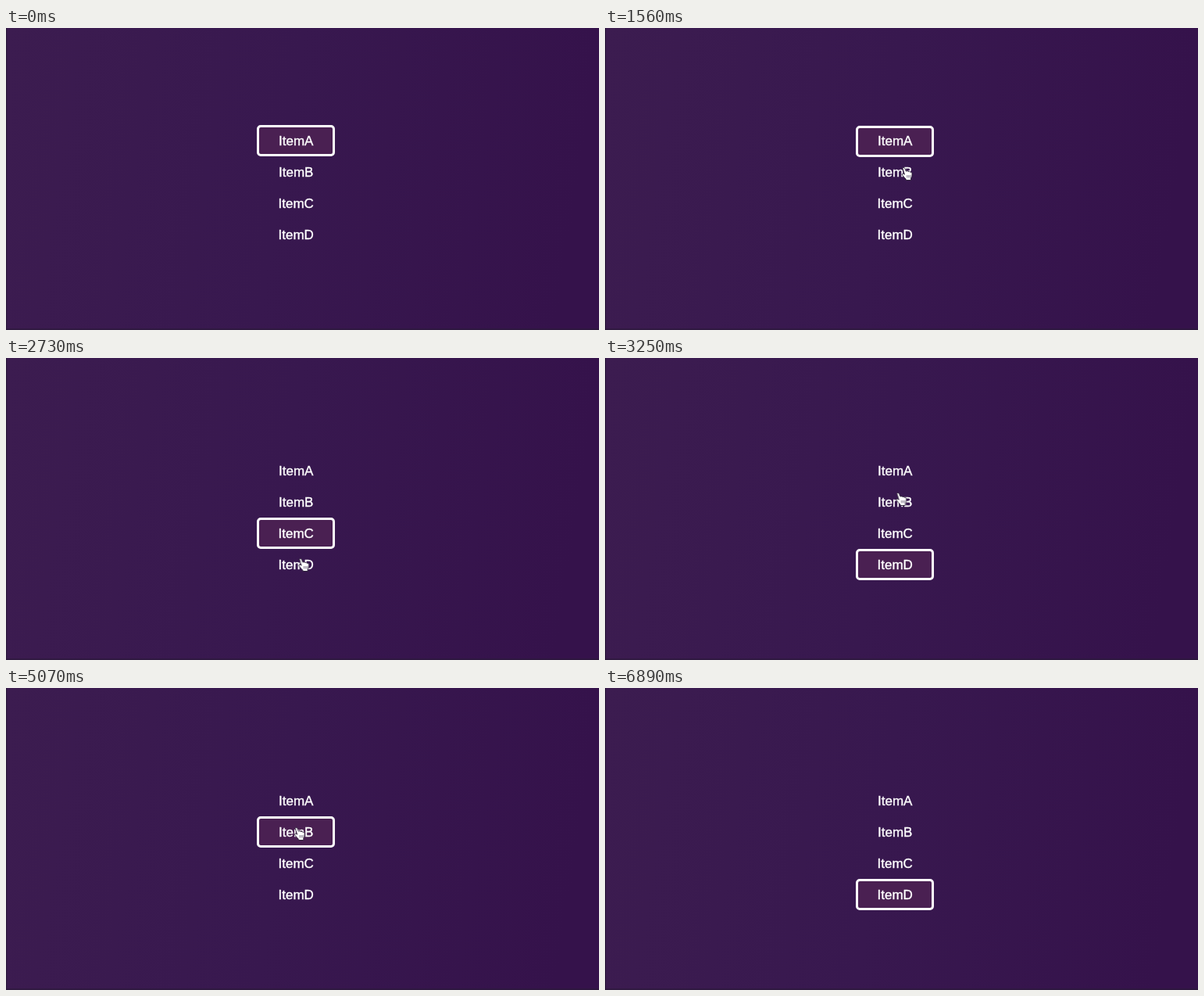
An HTML page for the animation above (7.28 s loop, 759x386 px).

```html
<!DOCTYPE html>
<html lang="en">
<head>
<meta charset="utf-8">
<title>Menu</title>
<style>
  html, body { margin: 0; width: 100%; height: 100%; overflow: hidden; background: #381850; }
  svg { display: block; width: 759px; height: 386px; }
  text {
    font: 17px "Liberation Sans", Arial, sans-serif;
    fill: #fff; stroke: #fff; stroke-width: .4; text-anchor: middle;
  }
</style>
</head>
<body>
<svg viewBox="0 0 759 386">
  <defs>
    <linearGradient id="bg" x1="0" y1="0" x2="1" y2="0.08">
      <stop offset="0" stop-color="#3c1c50"/>
      <stop offset=".5" stop-color="#38184f"/>
      <stop offset="1" stop-color="#35124b"/>
    </linearGradient>
  </defs>
  <rect width="759" height="386" fill="url(#bg)"/>
  <path d="M0.5 0V386M0 385H759" stroke="#2c1a3c" stroke-width="1.5"/>
  <g id="box">
    <rect x="322.5" y="1.5" width="97" height="37" rx="3.5" fill="#4a2052" stroke="#fff" stroke-width="3"/>
  </g>
  <g id="labels"></g>
  <g id="hand">
    <path d="M1 1.5C1 0 3 0 3.6 1.2L5.4 5.2C6.4 4.4 7.6 4.6 8.2 5.6 9.2 5 10.4 5.3 10.8 6.4 12 6 13 6.8 13 8 13.2 11 12.6 12.4 11.6 14V16.5H5.4L5 15C3.4 13.6 2 11.5 .6 10-.4 8.6 1 7.6 2.2 8.4L3.4 9.2Z"
      fill="#fff" stroke="#241a30" stroke-width=".9" stroke-linejoin="round"/>
    <path d="M6.8 10V13.4M8.8 10V13.4M10.8 10V13.4" stroke="#4a3c58" stroke-width=".7"/>
  </g>
</svg>
<script>
const LOOP = 7280, TICK = 130, TOP = 124, ROW = 40, SLIDE = 220;
const SPRING = 'cubic-bezier(.4, 0, .3, 1.5)';
const A = 0, B = 1, C = 2, D = 3, OFF = 6.8;
const $ = id => document.getElementById(id);

['ItemA', 'ItemB', 'ItemC', 'ItemD'].forEach((name, i) => {
  const label = document.createElementNS('http://www.w3.org/2000/svg', 'text');
  label.setAttribute('x', 371.2);
  label.setAttribute('y', 150 + i * ROW);
  label.textContent = name;
  $('labels').append(label);
});

const key = (ms, x, y, easing = 'linear') =>
  ({ offset: ms / LOOP, transform: `translate(${x}px, ${y}px)`, easing });

const play = (id, keys) => {
  const anim = $(id).animate(keys, { duration: LOOP, fill: 'both' });
  anim.pause();
  return anim;
};

// The hand travels to a row, then clicks it: [row, leave, travel, click]
const visits = [
  [B, 420, 300, 1542],
  [C, 1950, 260, 2330],
  [D, 2600, 130, 2848],
  [A, 3000, 470, 3763],
  [B, 4030, 130, 4800],
  [C, 5070, 130, 5450],
  [D, 5720, 130, 5981],
  [OFF, 6400, 490]
];

const boxAt = (ms, row, ease) => key(ms, 0, TOP + row * ROW, ease);
const handAt = (ms, row, i, ease) => key(ms, 380 - 2.7 * i, 139 + 39 * row, ease);

const boxKeys = [boxAt(0, A)], handKeys = [handAt(0, OFF, 0)];
let picked = A, hover = OFF;
visits.forEach(([row, leave, travel, click], i) => {
  handKeys.push(handAt(leave, hover, Math.max(i - 1, 0), 'ease-out'), handAt(leave + travel, row, i));
  hover = row;
  if (!click) return;
  boxKeys.push(boxAt(click, picked, SPRING), boxAt(click + SLIDE, row));
  picked = row;
});
boxKeys.push(boxAt(LOOP, picked));
handKeys.push(handAt(LOOP, hover, visits.length - 1));

const anims = [play('box', boxKeys), play('hand', handKeys)];
const start = performance.now();

function draw() {
  const t = (performance.now() - start) % LOOP;
  const held = Math.floor(t / TICK) * TICK;
  for (const anim of anims) anim.currentTime = held;
  requestAnimationFrame(draw);
}
draw();
</script>
</body>
</html>
```
